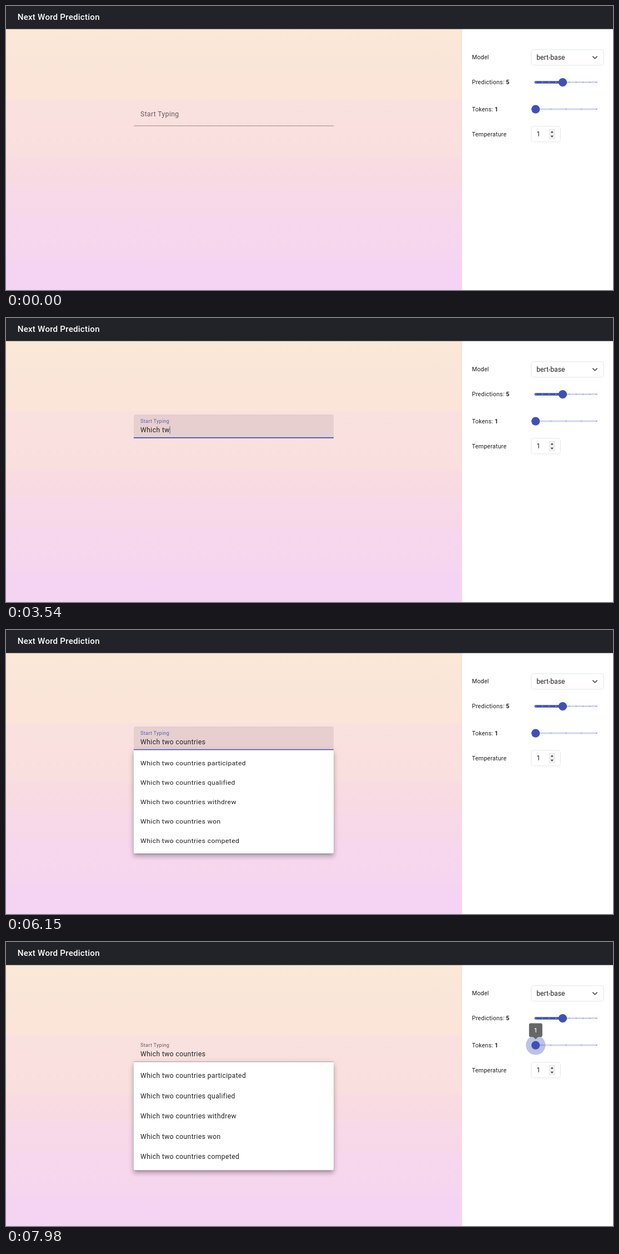
Write an HTML page that moves like this. It is 1093 by 512 pixels and loops after 8 s.

```html
<!DOCTYPE html>
<html lang="en">
<head>
<meta charset="utf-8">
<title>Next Word Prediction</title>
<style>
  html, body { margin: 0; width: 100%; height: 100%; overflow: hidden; background: #fff; }
  svg { display: block; width: 100%; height: 100%; }
  text { font-family: Roboto, Arial, sans-serif; white-space: pre; fill: #212121; }
  .body { font-size: 12.16px; letter-spacing: .38px; }
  .side { font-size: 10.64px; letter-spacing: .2px; }
  .plain { font-size: 12.16px; }
  .bold { font-weight: 700; }
</style>
</head>
<body>
<svg id="stage" viewBox="0 0 1093 512">
  <defs>
    <linearGradient id="sky" gradientUnits="userSpaceOnUse" x1="0" y1="42" x2="0" y2="512"></linearGradient>
  </defs>
</svg>
<script>
const LOOP = 8000, STEP = 30;
const PHRASE = 'Which two countries';
const ENDINGS = ['participated', 'qualified', 'withdrew', 'won', 'competed'];
const KEY_TIMES = [1950, 2220, 2430, 2550, 2700, 2880, 3270, 3540, 3720, 3900,
  4170, 4350, 4500, 4680, 4830, 5040, 5190, 5340, 5550];
const FOCUS = 1260, OPEN = 6098, BLUR = 7720;
const INDIGO = '#3f51b5';
const FIELD = { x: 230, y: 174, w: 360, h: 42.6 };
const TEXT_X = 242.1, PANEL_Y = 216.6, ROW = 36.48;

const stage = document.getElementById('stage');

function add(tag, attrs = {}, parent = stage, content = '') {
  const node = document.createElementNS('http://www.w3.org/2000/svg', tag);
  set(node, attrs);
  node.textContent = content;
  parent.appendChild(node);
  return node;
}
function set(node, attrs) {
  for (const name in attrs) node.setAttribute(name, attrs[name]);
}
const rect = (x, y, width, height, attrs, parent) => add('rect', { x, y, width, height, ...attrs }, parent);
const circle = (cx, cy, r, attrs, parent) => add('circle', { cx, cy, r, ...attrs }, parent);
const label = (x, y, content, attrs, parent) => add('text', { x, y, ...attrs }, parent, content);

const clamp = v => Math.min(1, Math.max(0, v));
const mix = (a, b, p) => a + (b - a) * p;
const mixColor = (a, b, p) => `rgba(${a.map((v, i) => mix(v, b[i], p)).join(',')})`;

function bezier(x1, y1, x2, y2) {
  const at = (a, b, s) => 3 * a * s * (1 - s) ** 2 + 3 * b * s * s * (1 - s) + s ** 3;
  return x => {
    if (x <= 0 || x >= 1) return clamp(x);
    let lo = 0, hi = 1;
    for (let i = 0; i < 24; i++) {
      const mid = (lo + hi) / 2;
      if (at(x1, x2, mid) < x) lo = mid; else hi = mid;
    }
    return at(y1, y2, lo);
  };
}
const standard = bezier(.4, 0, .2, 1);
const decelerate = bezier(0, 0, .2, 1);

// Page background and header
const sky = document.getElementById('sky');
[[42, '#fbe8d6'], [100, '#fae6d8'], [167, '#fae5d8'], [169, '#f9e1df'], [270, '#f9e0df'],
 [278, '#f8dce2'], [320, '#f8dbe2'], [327, '#f7d9e8'], [375, '#f7d8e9'], [380, '#f6d7ec'],
 [450, '#f5d6ee'], [460, '#f5d4f2'], [512, '#f5d3f3']]
  .forEach(([y, color]) => add('stop', { offset: (y - 42) / 470, 'stop-color': color }, sky));
rect(0, 41, 821, 471, { fill: 'url(#sky)' });
rect(820.4, 41, .8, 471, { fill: '#dcdce0' });
rect(0, 0, 1093, 41.6, { fill: '#222328' });
label(20.7, 25.2, 'Next Word Prediction',
  { style: 'font-size:15.2px;font-weight:500;letter-spacing:.19px;fill:#fff' });

// Settings column
function setting(y, name, value) {
  const node = label(839, y + 3.8, name, { class: 'side' });
  if (value) add('tspan', { class: 'bold' }, node, value);
}
const box = (x, y, w, h) => rect(x, y, w, h, { rx: 4.2, fill: '#fff', stroke: '#dee2e6', 'stroke-width': .9 });

setting(92.6, 'Model');
setting(137.6, 'Predictions: ', '5');
setting(186, 'Tokens: ', '1');
setting(231, 'Temperature');

box(945.9, 78.8, 130.2, 28);
label(955.2, 97, 'bert-base', { class: 'plain' });
add('path', { d: 'M1056.7 91l3.8 3.8 3.8-3.8', fill: 'none', stroke: '#343a40',
  'stroke-width': 1.5, 'stroke-linecap': 'round', 'stroke-linejoin': 'round' });

box(945.9, 217, 52.4, 28);
label(955.2, 235.2, '1', { class: 'plain' });
rect(977.4, 222, 11.4, 18, { fill: '#efefef' });
add('path', { d: 'M980.6 228.4h5.2l-2.6-3.2zM980.6 233.8h5.2l-2.6 3.2z', fill: '#4a4a4a' });

function slider(y, steps, index) {
  const left = 953.7, gap = 109.6 / steps, thumbX = left + gap * index;
  rect(951.5, y - 1.5, 114, 3, { rx: 1.5, fill: INDIGO, opacity: .24 });
  if (index) rect(951.5, y - 2.3, thumbX - 951.5, 4.6, { rx: 2.3, fill: INDIGO });
  for (let i = 0; i <= steps; i++)
    circle(left + gap * i, y, .78, { fill: i < index ? '#fff' : INDIGO, opacity: .65 });
  const halo = circle(thumbX, y, 0, { fill: INDIGO, opacity: .34 });
  circle(thumbX, y + .8, 7.7, { fill: '#000', opacity: .14 });
  circle(thumbX, y, 7.6, { fill: INDIGO });
  return halo;
}
slider(137.5, 9, 4);
const halo = slider(186, 4, 0);

const tip = add('g');
add('path', { fill: '#666', d: 'M944.8 146.6h18a3 3 0 0 1 3 3v18.6a3 3 0 0 1-3 3h-4.5l-4.5 4-4.5-4h-4.5a3 3 0 0 1-3-3v-18.6a3 3 0 0 1 3-3z' }, tip);
label(953.8, 162.5, '1', { style: 'font-size:10.64px;font-weight:500;fill:#fff', 'text-anchor': 'middle' }, tip);

// Text field
const { x: fx, y: fy, w: fw, h: fh } = FIELD;
const shade = add('path', { fill: '#000',
  d: `M${fx} ${fy + fh}V${fy + 3}a3 3 0 0 1 3-3h${fw - 6}a3 3 0 0 1 3 3V${fy + fh}z` });
rect(fx, fy + fh - 1, fw, .9, { fill: '#000', opacity: .44 });
const activeLine = rect(fx, fy + fh - 1.6, fw, 1.6, { fill: INDIGO });
const hint = label(0, 0, 'Start Typing', { class: 'body' });
const typed = label(TEXT_X, 205.5, '', { class: 'body' });
const caret = rect(0, 195, .8, 14, { fill: INDIGO });

// Suggestions
const panel = add('g');
const panelH = ROW * 5 + 12.2;
function shadow(dy, blur, spread, alpha) {
  rect(fx - spread, PANEL_Y + dy - spread, fw + 2 * spread, panelH + 2 * spread,
    { rx: 3, fill: '#000', opacity: alpha, style: `filter:blur(${blur / 2}px)` }, panel);
}
shadow(3.8, 3.8, -2.3, .2);
shadow(6.1, 7.6, .76, .14);
shadow(2.3, 10.6, 1.5, .12);
add('path', { fill: '#fff',
  d: `M${fx} ${PANEL_Y}h${fw}v${panelH - 3}a3 3 0 0 1-3 3h${6 - fw}a3 3 0 0 1-3-3z` }, panel);
ENDINGS.forEach((word, i) =>
  label(TEXT_X, PANEL_Y + 6.1 + ROW * (i + .5) + 4.15, `${PHRASE} ${word}`, { class: 'body' }, panel));

function scaleAbout(x, y, sx, sy) {
  return `translate(${x} ${y}) scale(${sx} ${sy}) translate(${-x} ${-y})`;
}

function drawField(t) {
  const since = t - FOCUS, gone = t - BLUR;
  const float = standard(since / 150);
  const line = standard(since / 180);
  const fade = standard(gone / 180);
  const focused = since > 0 && gone < 0;

  set(shade, { opacity: .08 * clamp(since / 75) * (1 - clamp(gone / 75)) });
  set(activeLine, { x: fx + fw / 2 * (1 - line), width: fw * line, opacity: line * (1 - fade) });

  const tint = float * (1 - standard(gone / 150));
  set(hint, {
    transform: `translate(${TEXT_X} ${mix(199.4, 188.5, float)}) scale(${mix(1, .75, float)})`,
    style: `fill:${mixColor([0, 0, 0, .6], [63, 81, 181, .87], tint)}`
  });

  const count = KEY_TIMES.filter(k => k <= t).length;
  const content = PHRASE.slice(0, count);
  if (typed.textContent !== content) typed.textContent = content;
  const lastInput = count ? KEY_TIMES[count - 1] : 1290;
  const lit = focused && (t - lastInput) % 900 < 450;
  set(caret, { x: TEXT_X + (count ? typed.getComputedTextLength() : 0), opacity: lit ? 1 : 0 });
}

function drawPanel(t) {
  const p = decelerate((t - OPEN) / 120);
  set(panel, { opacity: clamp(p * 1.3), transform: scaleAbout(0, PANEL_Y, 1, mix(.8, 1, p)) });
}

function drawPress(t) {
  const pop = decelerate((t - BLUR) / 100);
  set(halo, { r: 17.6 * decelerate((t - BLUR) / 240) });
  set(tip, { opacity: pop > 0 ? 1 : 0, transform: scaleAbout(953.8, 175.2, pop, pop) });
}

function draw(time) {
  const t = Math.floor(time % LOOP / STEP) * STEP;
  drawField(t);
  drawPanel(t);
  drawPress(t);
}

let start;
function tick(now) {
  start ??= now;
  draw(now - start);
  requestAnimationFrame(tick);
}
draw(0);
requestAnimationFrame(tick);
</script>
</body>
</html>
```
